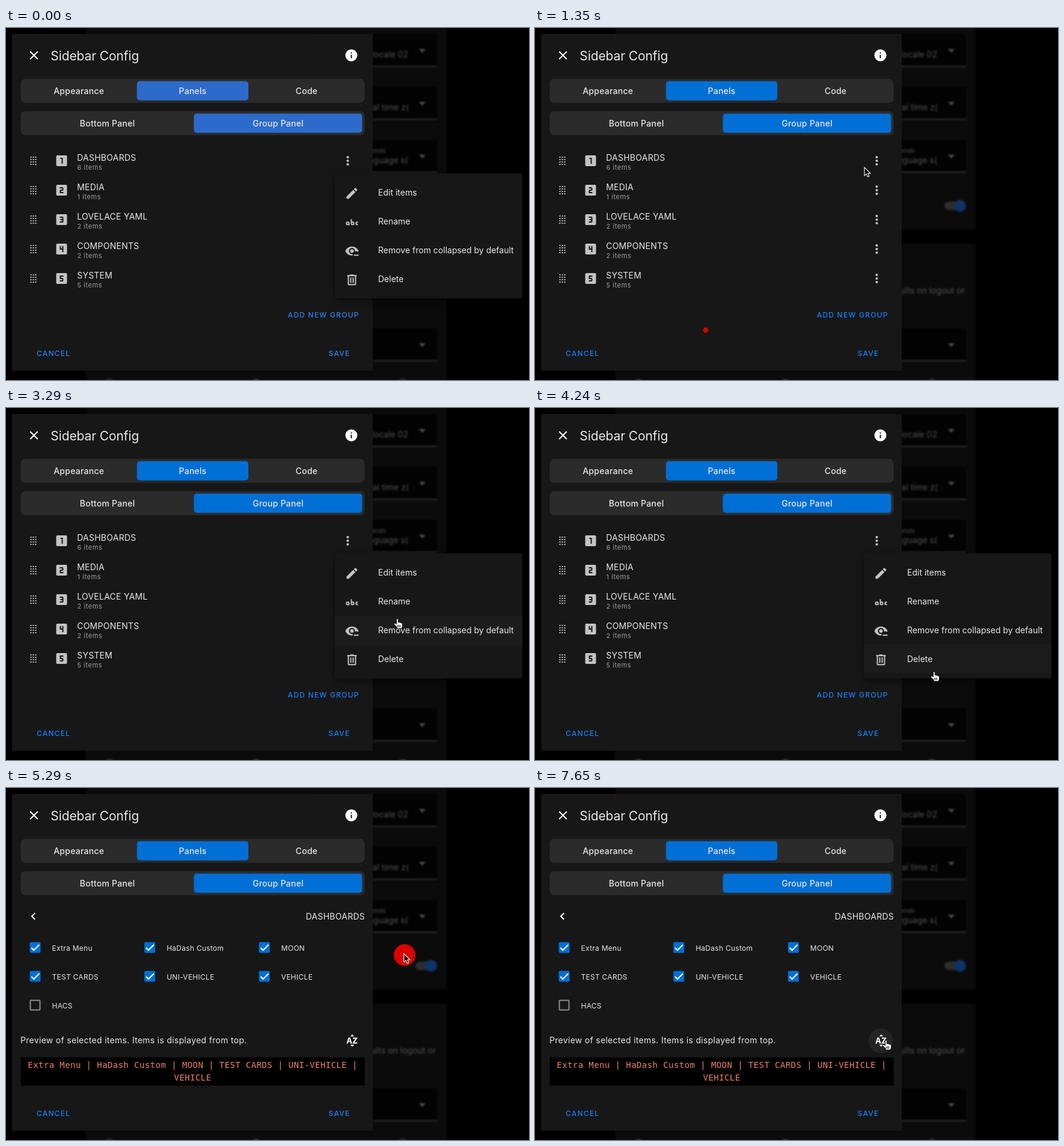
Animation, 870 px wide and 586 px high, one loop 8 s. Source, as an HTML page:

```html
<!DOCTYPE html>
<html lang="en">
<head>
<meta charset="utf-8">
<title>Sidebar Config</title>
<style>
html, body { margin: 0; width: 100%; height: 100%; overflow: hidden; background: #000; }
svg { display: block; font-family: Inter, sans-serif; fill: #e8e8e8; --blue: #006fd5; --link: #1580fa; }
svg.muted { --blue: #2d6bcb; --link: #2e80ec; }
text { white-space: pre; }
.title { font-size: 21px; letter-spacing: -.1px; }
.tab { font-size: 14px; font-weight: 500; letter-spacing: .25px; text-anchor: middle; }
.name { font-size: 14px; letter-spacing: .25px; }
.sub { font-size: 11px; letter-spacing: .55px; fill: #9c9c9c; }
.link { font-size: 12px; font-weight: 500; letter-spacing: 1.22px; fill: var(--link); }
.label { font-size: 12px; letter-spacing: .27px; }
.note { font-size: 14px; letter-spacing: .3px; }
.item { font-size: 14px; }
.code { font: 14px "DejaVu Sans Mono", monospace; letter-spacing: .42px; fill: #ee806b; text-anchor: middle; }
.page text { font-size: 14px; fill: #525252; text-anchor: end; }
.icon { fill: #c3c3c3; fill-rule: evenodd; }
.bright { fill: #fff; fill-rule: evenodd; }
.digit { fill: none; stroke: #171717; stroke-width: 2; }
</style>
</head>
<body>
<svg id="stage" width="870" height="586" viewBox="0 0 870 586"></svg>
<script>
const stage = document.getElementById('stage');

function add(parent, tag, attrs = {}, content) {
  const el = document.createElementNS('http://www.w3.org/2000/svg', tag);
  for (const key in attrs) el.setAttribute(key, attrs[key]);
  if (content !== undefined) el.textContent = content;
  return parent.appendChild(el);
}
const group = (parent, attrs) => add(parent, 'g', attrs);
const rect = (parent, x, y, width, height, fill, rx = 0) =>
  add(parent, 'rect', { x, y, width, height, fill, rx });
const circle = (parent, cx, cy, r, fill) => add(parent, 'circle', { cx, cy, r, fill });
const text = (parent, cls, x, y, content) => add(parent, 'text', { class: cls, x, y }, content);
// Icons live on a 24 px grid and are placed by their centre.
const icon = (parent, cx, cy, d, cls = 'icon') =>
  add(parent, 'path', { class: cls, d, transform: `translate(${cx - 12} ${cy - 12})` });

const ICONS = {
  close: 'M19 6.41L17.59 5L12 10.59L6.41 5L5 6.41L10.59 12L5 17.59L6.41 19L12 13.41L17.59 19L19 17.59L13.41 12Z',
  info: 'M13 9H11V7H13M13 17H11V11H13M12 2A10 10 0 0 0 2 12A10 10 0 0 0 12 22A10 10 0 0 0 22 12A10 10 0 0 0 12 2Z',
  back: 'M15.41 16.58L10.83 12L15.41 7.41L14 6L8 12L14 18Z',
  pencil: 'M20.71 7.04C21.1 6.65 21.1 6 20.71 5.63L18.37 3.29C18 2.9 17.35 2.9 16.96 3.29L15.12 5.12L18.87 8.87M3 17.25V21H6.75L17.81 9.93L14.06 6.18Z',
  abc: 'M6 11A2 2 0 0 1 8 13V17H4A2 2 0 0 1 2 15V13A2 2 0 0 1 4 11H6M4 13V15H6V13H4M20 13V15H22V17H20A2 2 0 0 1 18 15V13A2 2 0 0 1 20 11H22V13H20M12 7V11H14A2 2 0 0 1 16 13V15A2 2 0 0 1 14 17H12A2 2 0 0 1 10 15V7H12M12 15H14V13H12V15Z',
  eye: 'M12 4.5C7 4.5 2.73 7.61 1 12C2.73 16.39 7 19.5 12 19.5L13.1 19.45V17C12.7 17 12.4 17 12 17C9.24 17 7 14.76 7 12S9.24 7 12 7S17 9.24 17 12L16.92 12.84C17.58 12.63 18.27 12.5 19 12.5C20.17 12.5 21.31 12.84 22.29 13.5L23 12C21.27 7.61 17 4.5 12 4.5M12 9A3 3 0 0 0 12 15A3 3 0 0 0 12 9M15 18V20H23V18Z',
  trash: 'M9 3V4H4V6H5V19A2 2 0 0 0 7 21H17A2 2 0 0 0 19 19V6H20V4H15V3H9M7 6H17V19H7V6M9 8V17H11V8H9M13 8V17H15V8H13Z',
  sort: 'M9.25 5L12.5 1.75L15.75 5H9.25M15.75 19L12.5 22.25L9.25 19H15.75M8.89 14.3H6L5.28 17H2.91L6 7H9L12.13 17H9.67L8.89 14.3M6.33 12.68H8.56L7.42 8.63H7.39L6.33 12.68M13.05 17V15.74L17.8 8.97V8.91H13.5V7H20.73V8.34L16.09 15V15.08H20.8V17H13.05Z'
};
const DIGITS = [
  'M10 8H13V17',
  'M9 8H13a1 1 0 0 1 1 1v2a1 1 0 0 1-1 1H11a1 1 0 0 0-1 1V16H15',
  'M9 8H13a1 1 0 0 1 1 1V15a1 1 0 0 1-1 1H9M10 12H14',
  'M10 7V12H14M14 7V17',
  'M15 8H10V12H13a1 1 0 0 1 1 1v2a1 1 0 0 1-1 1H9'
];

function drawPage() {
  const page = group(stage, { class: 'page', style: 'filter: blur(1.7px)' });
  rect(page, 133, -10, 600, 345, '#0b0b0b');
  rect(page, 133, 359, 600, 240, '#0b0b0b');
  for (const y of [10, 98, 186, 500]) {
    rect(page, 512, y, 205, 54, '#030303', 3);
    rect(page, 512, y + 53, 205, 2, '#303030');
    add(page, 'path', { d: `M687 ${y + 25}h11l-5.5 6z`, fill: '#505050' });
  }
  text(page, '', 669, 49, 'Use user locale 02');
  text(page, '', 670, 137, 'Use local time z(');
  text(page, '', 669, 225, 'Use language s(');
  text(page, '', 632, 208, 'weekends').style.fontSize = '10px';
  text(page, '', 715, 442, 'Clear defaults on logout or');
  rect(page, 681, 289, 34, 14, '#2c2c2c', 7);
  circle(page, 707, 296, 10, '#0d3369');
  for (const x of [172, 416, 660]) circle(page, x, 593, 9, '#383838');
}

function drawDialog() {
  rect(stage, 10, 10, 600, 560.5, '#171717', 1);
  icon(stage, 46.5, 45.5, ICONS.close, 'bright');
  text(stage, 'title', 74.3, 54, 'Sidebar Config');
  icon(stage, 574.5, 45.5, ICONS.info, 'bright');
  rect(stage, 24.5, 84.5, 572, 40, '#2b2b2b', 8);
  rect(stage, 24.5, 138.5, 572, 40, '#2b2b2b', 8);
  rect(stage, 217.8, 88.5, 185.4, 32, 'var(--blue)', 5);
  rect(stage, 312.5, 142.5, 280, 32, 'var(--blue)', 5);
  [['Appearance', 121.2, 109.5], ['Panels', 310.6, 109.5], ['Code', 500, 109.5],
   ['Bottom Panel', 168.6, 163.5], ['Group Panel', 452.6, 163.5]]
    .forEach(([label, x, y]) => text(stage, 'tab', x, y, label));
  text(stage, 'link', 50.9, 545.5, 'CANCEL');
  text(stage, 'link', 536.5, 545.5, 'SAVE');
}

function drawGroups() {
  const view = group(stage);
  const hover = circle(view, 568.5, 221, 20, '#242424');
  const groups = [['DASHBOARDS', 6], ['MEDIA', 1], ['LOVELACE YAML', 2], ['COMPONENTS', 2], ['SYSTEM', 5]];
  groups.forEach(([name, count], i) => {
    const y = 221 + 49 * i;
    let grip = '';
    for (let n = 0; n < 12; n++) grip += `M${7 + 4 * (n % 3)} ${5 + 4 * (n / 3 | 0)}h2v2h-2z`;
    icon(view, 45.5, y, grip);
    rect(view, 83.5, y - 9, 18, 18, '#c3c3c3', 2);
    icon(view, 92.5, y, DIGITS[i], 'digit');
    text(view, 'name', 118.2, y - .3, name);
    text(view, 'sub', 118.6, y + 14.5, count + ' items');
    for (const dy of [-6, 0, 6]) circle(view, 568.5, y + dy, 2.1, '#c3c3c3');
  });
  text(view, 'link', 468.7, 482, 'ADD NEW GROUP');
  return { view, hover };
}

function drawItems() {
  const view = group(stage);
  icon(view, 45.5, 213.5, ICONS.back, 'bright');
  text(view, 'name', 597, 218.5, 'DASHBOARDS').style.textAnchor = 'end';
  ['Extra Menu', 'HaDash Custom', 'MOON', 'TEST CARDS', 'UNI-VEHICLE', 'VEHICLE', 'HACS'].forEach((label, i) => {
    const x = 48.5 + 190.67 * (i % 3), y = 265.5 + 48 * (i / 3 | 0);
    if (label === 'HACS') {
      add(view, 'rect', { x: x - 8, y: y - 8, width: 16, height: 16, rx: 1, fill: 'none', stroke: '#8d8d8d', 'stroke-width': 2 });
    } else {
      rect(view, x - 9, y - 9, 18, 18, 'var(--blue)', 2);
      add(view, 'path', { d: `M${x - 6.2} ${y + .5}l4 4l9-9`, fill: 'none', stroke: '#fff', 'stroke-width': 2 });
    }
    text(view, 'label', x + 28, y + 5, label);
  });
  text(view, 'note', 24, 425.3, 'Preview of selected items. Items is displayed from top.');
  const hover = circle(view, 575.5, 421, 20.5, '#242424');
  icon(view, 575.5, 420.5, ICONS.sort, 'bright');
  rect(view, 24.5, 448.5, 572, 47, '#000');
  text(view, 'code', 310.6, 466, 'Extra Menu | HaDash Custom | MOON | TEST CARDS | UNI-VEHICLE |');
  text(view, 'code', 310.6, 487, 'VEHICLE');
  return { view, hover };
}

function drawMenu() {
  const menu = group(stage);
  rect(menu, 547, 242, 312, 208, '#171717', 4).style.filter = 'drop-shadow(0 4px 6px #0008)';
  const hover = rect(menu, 547, 250, 312, 48, '#1c1c1c');
  [['Edit items', 'pencil'], ['Rename', 'abc'], ['Remove from collapsed by default', 'eye'], ['Delete', 'trash']]
    .forEach(([label, name], i) => {
      const y = 275 + 48 * i;
      icon(menu, 575.5, y + .3, ICONS[name]);
      text(menu, 'item', 619, y + 4.2, label);
    });
  return { menu, hover };
}

drawPage();
drawDialog();
const groups = drawGroups();
const items = drawItems();
const { menu, hover: menuHover } = drawMenu();
const dot = circle(stage, 0, 0, 0, '#e60000');
dot.setAttribute('fill-opacity', .94);
const cursor = group(stage);
const arrow = add(cursor, 'path', {
  d: 'M0 0V13.8L3.2 10.9L5.3 15.8L7.8 14.7L5.7 10H10Z', fill: '#000', stroke: '#fff', 'stroke-width': 1.1
});
const hand = add(cursor, 'path', {
  d: 'M-1.4 8.5V1.2a1.4 1.4 0 0 1 2.8 0V6c.8-.9 2.3-.7 2.6.4.9-.6 2.2-.2 2.4.8 1-.4 2.1.2 2.1 1.3v3c0 2.5-1 2.6-1.3 4.5h-7.4c-.5-2.3-2.9-4.2-4.9-6.9-1-1.6.9-2.6 2.2-1.3z M2.3 10v4M4.5 10v4M.2 10v4',
  transform: 'translate(0 -1)', fill: '#fff', stroke: '#000', 'stroke-width': .9
});

const LOOP = 8000;
// time, x, y of the pointer tip
const PATH = [
  [60, 322, 590], [450, 300, 530], [820, 284, 503], [1100, 284, 503], [1350, 548, 232], [1450, 567, 216],
  [2480, 564, 216], [2880, 646, 338], [3060, 646, 338], [3280, 651, 352], [3560, 651, 352],
  [4240, 664, 440], [4450, 664, 440], [5000, 663, 278], [5290, 662, 276], [5650, 570, 300],
  [6080, 425, 300], [6220, 300, 200], [6360, 161, 290], [6500, 205, 438], [6650, 323, 378],
  [6880, 312, 343], [7300, 608, 442], [7600, 584, 421], [LOOP, 584, 421]
];
const CLICKS = [[1088, 284, 503], [1458, 568, 215], [5140, 663, 278]];
const CLICK_TIME = 290;

const show = (el, on) => { el.style.display = on ? '' : 'none'; };
const clamp = v => Math.min(1, Math.max(0, v));

function pointerAt(t) {
  const i = Math.max(1, PATH.findIndex(p => p[0] >= t));
  const [t0, x0, y0] = PATH[i - 1], [t1, x1, y1] = PATH[i];
  const p = clamp((t - t0) / (t1 - t0)), e = p * p * (3 - 2 * p);
  return [x0 + (x1 - x0) * e, y0 + (y1 - y0) * e];
}

function render(t) {
  const [x, y] = pointerAt(t);
  const editing = t >= 5240;
  const opacity = t < 1600 ? clamp((1235 - t) / 75) : editing ? 0 : clamp((t - 1680) / 100);
  stage.classList.toggle('muted', t < 60);
  show(groups.view, !editing);
  show(items.view, editing);
  show(menu, opacity > 0);
  menu.style.opacity = opacity;

  const row = Math.floor((y - 250) / 48);
  const onRow = opacity === 1 && x > 547 && row >= 0 && row < 4;
  show(menuHover, onRow);
  if (onRow) menuHover.setAttribute('y', 250 + 48 * row);
  const onDots = !editing && t < 1720 && Math.hypot(x - 568.5, y - 221) < 20;
  const onSort = editing && Math.hypot(x - 575.5, y - 421) < 20;
  show(groups.hover, onDots);
  show(items.hover, onSort);

  const click = CLICKS.find(c => t >= c[0] && t < c[0] + CLICK_TIME);
  show(dot, click);
  if (click) {
    const p = (t - click[0]) / CLICK_TIME;
    dot.setAttribute('cx', click[1]);
    dot.setAttribute('cy', click[2]);
    dot.setAttribute('r', 24.7 * (1 - p * p));
  }

  const pointing = onRow || onDots || onSort;
  show(cursor, t >= 60);
  show(hand, pointing);
  show(arrow, !pointing);
  cursor.setAttribute('transform', `translate(${x.toFixed(2)} ${y.toFixed(2)})`);
}

const start = performance.now();
function tick(now) {
  render(Math.max(0, now - start) % LOOP);
  requestAnimationFrame(tick);
}
render(0);
requestAnimationFrame(tick);
</script>
</body>
</html>
```
